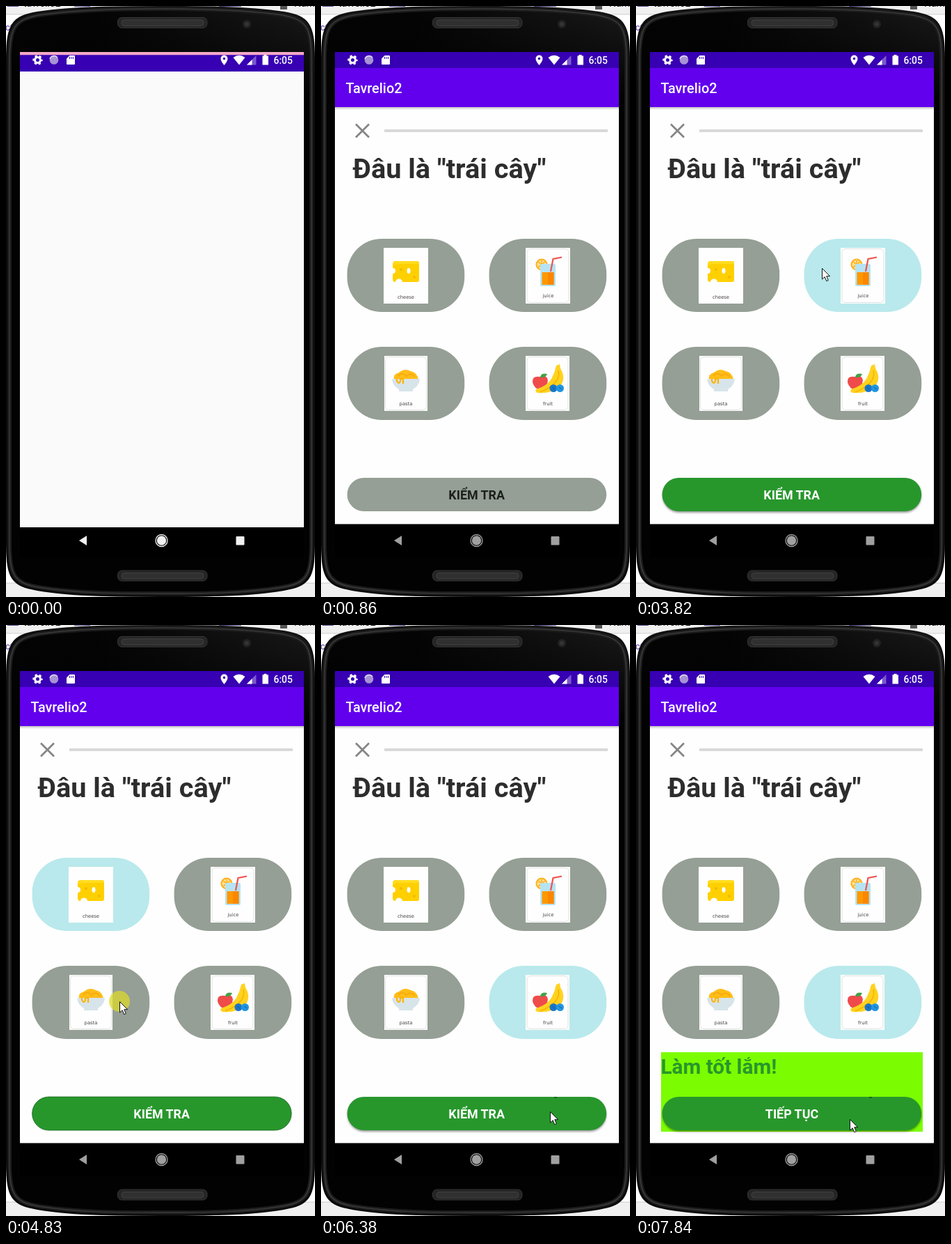
These frames come from a looping animation (444x848 px, 8 s). An HTML page:

```html
<!DOCTYPE html>
<html lang="vi">
<head>
<meta charset="utf-8">
<title>Quiz app</title>
<style>
html, body { margin: 0; width: 100%; height: 100%; overflow: hidden; background: #f2f2f2; }
svg { display: block; width: 444px; height: 848px; font-family: Roboto, sans-serif; }
text { white-space: pre; }

/* 1% of the loop is 80 ms; every change is a hard step */
.anim { animation: 8s step-end infinite; }
.label { font: 6.8px "DejaVu Sans", sans-serif; fill: #444; text-anchor: middle; }
.action { font-size: 17.86px; font-weight: 700; text-anchor: middle; }
.pill { fill: #959f95; }
.paper { fill: #fefefe; }
.edge { fill: none; stroke: #dcdfdc; stroke-width: .9; }

#first { animation-name: first; }
@keyframes first { 0% { opacity: 1 } .875%, 100% { opacity: 0 } }
#splash { animation-name: splash; }
@keyframes splash {
  0% { opacity: 1 } 7% { opacity: .8 } 7.94% { opacity: .6 }
  8.875% { opacity: .36 } 9.81% { opacity: .15 } 10.75%, 100% { opacity: 0 }
}
#nav { animation-name: nav; }
@keyframes nav { 0% { color: #f1f1f1 } 4% { color: #e0e0e0 } 7% { color: #cfcfcf } 8.875% { color: #b5b5b5 } 10.75%, 100% { color: #a0a0a0 } }
#pin { animation-name: pin; }
@keyframes pin { 0% { opacity: 1 } 71%, 100% { opacity: 0 } }

#juice { animation-name: juice; }
#cheese { animation-name: cheese; }
#pasta { animation-name: pasta; }
#fruit { animation-name: fruit; }
@keyframes juice { 35.875% { fill: #b9e9ec } 52.5% { fill: #959f95 } }
@keyframes cheese { 52.5% { fill: #b9e9ec } 62.25% { fill: #959f95 } }
@keyframes pasta { 62.25% { fill: #b9e9ec } 69.125% { fill: #959f95 } }
@keyframes fruit { 69.125%, 100% { fill: #b9e9ec } }

#button { animation-name: button; }
@keyframes button {
  0% { fill: #959f95; stroke: none }
  35.875% { fill: #27972c; stroke: none }
  52.5% { fill: #27972c; stroke: #17651b }
  65%, 100% { fill: #27972c; stroke: none }
}
#shadow { animation-name: shadow; }
@keyframes shadow { 0% { opacity: 0 } 37% { opacity: 1 } 52.5% { opacity: 0 } 65%, 100% { opacity: 1 } }
#check { animation-name: check; }
@keyframes check { 0% { fill: #1c1f1c; opacity: 1 } 35.875% { fill: #fff; opacity: 1 } 87.5%, 100% { fill: #fff; opacity: 0 } }
.done { animation-name: done; }
@keyframes done { 0% { opacity: 0 } 87.5%, 100% { opacity: 1 } }
#speck { animation-name: speck; }
@keyframes speck { 0% { opacity: 0 } 76.875%, 100% { opacity: 1 } }

#cursor { animation-name: move; }
@keyframes move {
  0% { transform: translate(500px, 900px) }
  23.375% { transform: translate(436px, 697px); animation-timing-function: steps(7) }
  30.125% { transform: translate(226px, 462px) }
  31.06% { transform: translate(219px, 440px); animation-timing-function: steps(2) }
  33% { transform: translate(262px, 408px) }
  34% { transform: translate(277px, 390px) }
  35% { transform: translate(268px, 377px) }
  47.75% { transform: translate(267px, 376px); animation-timing-function: steps(4) }
  51.75% { transform: translate(163px, 414px) }
  57.5% { transform: translate(163px, 446px); animation-timing-function: steps(2) }
  59.4% { transform: translate(163px, 540px) }
  63.25% { transform: translate(201px, 540px); animation-timing-function: steps(3) }
  66% { transform: translate(316px, 538px) }
  76.875% { transform: translate(318px, 575px); animation-timing-function: steps(3) }
  79.75% { transform: translate(329px, 698px) }
  80.75% { transform: translate(327px, 712px) }
  83.5% { transform: translate(316px, 716px) }
  85.5% { transform: translate(310px, 708px) }
  97%, 100% { transform: translate(307px, 709px) }
}
#click { animation-name: click; }
@keyframes click {
  0%, 39%, 53.5%, 62.25%, 69.125%, 75%, 88.5%, 97%, 100% { opacity: 0 }
  35%, 51.75%, 60.375%, 67%, 72.875%, 86.5%, 95.125% { opacity: .72 }
}
</style>
</head>
<body>
<svg viewBox="0 0 444 848">
  <defs>
    <linearGradient id="sheen" x1=".3" x2="1">
      <stop offset="0" stop-color="#040404"/><stop offset="1" stop-color="#1a1a1a"/>
    </linearGradient>
    <linearGradient id="sheenFade" x2="0" y2="1">
      <stop offset="0" stop-color="#020202" stop-opacity="0"/><stop offset=".16" stop-color="#020202"/>
    </linearGradient>
    <linearGradient id="fade" x2="0" y2="1">
      <stop offset="0" stop-color="#000" stop-opacity=".25"/><stop offset="1" stop-color="#000" stop-opacity="0"/>
    </linearGradient>
    <filter id="blur" x="-5%" y="-30%" width="110%" height="160%"><feGaussianBlur stdDeviation="1.6"/></filter>
    <path id="body" d="M1 76C1 26 9 15 45 9C100 1 165 1 222 1S344 1 399 9C435 15 443 26 443 76V772C443 822 435 832 399 838C344 847 280 847 222 847S100 847 45 838C9 832 1 822 1 772Z"/>
    <path id="rim" d="M5 78C5 30 12 20 47 13C102 5 165 4 222 4S342 5 397 13C432 20 439 30 439 78V770C439 818 432 828 397 834C342 843 280 843 222 843S102 843 47 834C12 828 5 818 5 770Z" fill="none"/>
    <rect id="pillShape" x="-.4" width="168.600" height="105" rx="49.600"/>
    <g id="speaker">
      <rect x="160.500" width="128.500" height="15" rx="6" fill="#252525" stroke="#353535"/>
      <rect x="166" y="3.500" width="118" height="8.500" rx="4" fill="#303030" stroke="#414141"/>
    </g>
  </defs>

  <!-- desktop behind the phone -->
  <rect width="444" height="848" fill="#f0f0f0"/>
  <rect y="12" width="444" height="816" fill="#fff"/>
  <path d="M0 12H444M0 828H444" stroke="#ccc"/>
  <text x="25" y="1" font-size="14" fill="#111">tavrelio2</text>
  <text x="414" y="1" font-size="14" fill="#111">Name</text>
  <text x="-8" y="35" font-size="13" fill="#5b35a5">acti</text>
  <path d="M2 0H18M98 0H121M306 0H338" stroke="#554d91" stroke-width="2"/>
  <path d="M394 0h10v5h-10z" fill="#555"/>

  <!-- phone -->
  <use href="#body" fill="url(#sheen)" stroke="#111" stroke-width="2"/>
  <use href="#body" fill="url(#sheenFade)"/>
  <use href="#rim" stroke="#1b1b1b" stroke-width="6"/>
  <use href="#rim" stroke="#3a3a3a" stroke-width="1.500"/>
  <use href="#speaker" y="16.500"/>
  <use href="#speaker" y="810"/>
  <circle cx="346" cy="26" r="6" fill="#222"/><circle cx="346" cy="26" r="3" fill="#343434"/>
  <rect x="20" y="66" width="408" height="725"/>

  <!-- app -->
  <rect x="20" y="89" width="408" height="654.400" fill="#fefefe"/>
  <rect x="20" y="89" width="408" height="56" fill="#6200ee"/>
  <rect x="20" y="145" width="408" height="4" fill="url(#fade)"/>
  <text x="35.500" y="125" font-size="19.840" font-weight="500" fill="#fff">Tavrelio2</text>
  <path d="M50 169.500L69 188.500M69 169.500L50 188.500" stroke="#858585" stroke-width="2.700"/>
  <rect x="91" y="177" width="321" height="4" fill="#d9d9d9"/>
  <text x="45.500" y="247" font-size="39.700" font-weight="700" fill="#2d2d2d">Đâu là "trái cây"</text>

  <g transform="translate(38 334)">
    <use id="cheese" class="pill anim" href="#pillShape"/>
    <rect class="paper" x="52" y="13" width="64" height="80"/>
    <path d="M69 32H100Q103 32 103 35V59Q103 62 100 62H79A5 4.500 0 0 0 69 62Q65 62 65 58V50A4 4 0 0 0 65 42V37Q65 32 69 32Z" fill="#ffd000"/>
    <path d="M65 38Q65 32 72 32H100Q103 32 103 36H76Q68 36 65 38Z" fill="#ffdc20"/>
    <ellipse cx="88" cy="46" rx="2.500" ry="4" fill="#fefefe"/>
    <circle cx="77" cy="44" r="2" fill="#f2b900"/><circle cx="96" cy="55" r="2" fill="#f2b900"/>
    <text class="label" x="84" y="86">cheese</text>
  </g>

  <g transform="translate(242 334)">
    <use id="juice" class="pill anim" href="#pillShape"/>
    <rect class="paper" x="52" y="13" width="64" height="80"/>
    <rect class="edge" x="54" y="14.500" width="60" height="77" rx="5"/>
    <circle cx="75" cy="37" r="8.500" fill="#ffb020"/><circle cx="75" cy="37" r="6.500" fill="#ffe08a"/>
    <path d="M70 33L80 41M80 33L70 41M75 31V43" stroke="#ffab19" stroke-width="1.300"/>
    <rect x="73" y="36" width="22" height="32" rx="2" fill="#b5e3f3"/>
    <path d="M75.500 48H92.500V66H75.500Z" fill="#ff9800"/>
    <path d="M84 48H92.500V66H84Z" fill="#fb8700"/>
    <path d="M88 47L91.500 29L104 26.500" fill="none" stroke="#ef5350" stroke-width="2.200"/>
    <text class="label" x="84.500" y="84">juice</text>
  </g>

  <g transform="translate(38 489)">
    <use id="pasta" class="pill anim" href="#pillShape"/>
    <rect class="paper" x="53" y="13" width="62" height="79"/>
    <rect class="edge" x="54.500" y="14.500" width="59" height="76" rx="5"/>
    <path d="M67 48Q65 39 74 37Q82 30 91 35Q101 37 102 48Z" fill="#ffbd17"/>
    <path d="M73 42Q78 35 85 42Q90 36 97 43" fill="none" stroke="#f5a70f" stroke-width="1.300"/>
    <path d="M64 46H104Q103 56 94 61V64H74V61Q65 56 64 46Z" fill="#d7e4ea"/>
    <path d="M71 46V49Q74 55 76 49V46H80V53" fill="none" stroke="#ffb300" stroke-width="2.200"/>
    <text class="label" x="84" y="84">pasta</text>
  </g>

  <g transform="translate(242 489)">
    <use id="fruit" class="pill anim" href="#pillShape"/>
    <rect class="paper" x="52" y="13" width="63" height="79"/>
    <rect class="edge" x="54" y="14.500" width="59" height="76" rx="5"/>
    <path d="M73 43Q82 39 84 48Q83 59 75 61Q65 62 62 51Q61 41 73 43Z" fill="#ef4b4b"/>
    <path d="M73 44Q74 37 83 39Q81 45 73 44Z" fill="#43a047"/>
    <path d="M96 27L101 25L102 31Q111 46 101 57Q88 68 69 66Q65 64 67 61Q83 56 89 46Q94 37 96 27Z" fill="#ffd21f"/>
    <path d="M99 34Q104 52 73 65" fill="none" stroke="#f5b400" stroke-width="1.600"/>
    <circle cx="92" cy="59.500" r="5.500" fill="#1976c9"/><circle cx="101.500" cy="59.500" r="5.500" fill="#2196df"/>
    <path d="M90 58l4 3M100 58l4 3" stroke="#0d5ca6"/>
    <text class="label" x="84" y="83.500">fruit</text>
  </g>

  <g class="done anim">
    <rect x="36" y="613" width="376" height="114" fill="#7cfc00"/>
    <text x="35.500" y="644" font-size="29.760" font-weight="700" fill="#27972c">Làm tốt lắm!</text>
  </g>
  <rect id="shadow" class="anim" x="38" y="679" width="372" height="48" rx="24" fill="#000" fill-opacity=".4" filter="url(#blur)"/>
  <rect id="button" class="anim" x="37.600" y="677" width="372.600" height="48" rx="24" stroke-width=".8"/>
  <text id="check" class="action anim" x="223.700" y="708">KIỂM TRA</text>
  <text class="action done anim" x="224" y="708" fill="#fff">TIẾP TỤC</text>
  <rect id="speck" class="anim" x="335" y="677" width="4" height="1.500" fill="#174f1a"/>

  <rect id="splash" class="anim" x="20" y="89" width="408" height="654.400" fill="#fafafa"/>

  <!-- system bars -->
  <rect x="20" y="66" width="408" height="23" fill="#3700b3"/>
  <g id="first" class="anim">
    <rect x="20" y="66" width="408" height="4.500" fill="#f4a9c7"/>
    <rect x="20" y="70.500" width="408" height="23.500" fill="#3700b3"/>
    <rect x="20" y="94" width="408" height="654" fill="#fafafa"/>
  </g>
  <g fill="#fff">
    <circle cx="45.500" cy="77.500" r="4" fill="none" stroke="#fff" stroke-width="3"/>
    <circle cx="45.500" cy="77.500" r="6" fill="none" stroke="#fff" stroke-width="2.400" stroke-dasharray="3.140" stroke-dashoffset="1.570"/>
    <circle cx="69" cy="77.500" r="6.300" fill="#a793d4"/>
    <path d="M63 76A6.300 6.300 0 0 1 74 74" fill="none" stroke="#e5dff4" stroke-width="1.500"/>
    <path d="M91.500 71H98Q99 71 99 72V83Q99 84 98 84H88Q87 84 87 83V75.500Z"/>
    <path d="M91.500 73v3M94 73v3M96.500 73v3" stroke="#3700b3"/>
    <path id="pin" class="anim" fill-rule="evenodd" d="M313.500 70.500A5 5 0 0 1 318.500 75.500Q318.500 79 313.500 85Q308.500 79 308.500 75.500A5 5 0 0 1 313.500 70.500ZM313.500 73.700A1.800 1.800 0 1 0 313.500 77.300A1.800 1.800 0 1 0 313.500 73.700Z"/>
    <path d="M326.500 74Q335 67.500 343.500 74L335 84.500Z"/>
    <path d="M359.500 71V84.500H346Z" opacity=".35"/><path d="M353.500 77V84.500H346Z"/>
    <path d="M370.500 70H374.500V71.500H377V84.500H368.500V71.500H370.500Z"/>
    <text x="384.500" y="83" font-size="13.900" font-weight="500">6:05</text>
  </g>
  <g id="nav" class="anim" fill="currentColor">
    <path d="M105 767L116 760V774Z"/>
    <circle cx="223.500" cy="767" r="6.700"/>
    <circle cx="223.500" cy="767" r="8.500" fill="none" stroke="currentColor" stroke-width="1.300"/>
    <rect x="330.500" y="761" width="12" height="12.500" rx="1"/>
  </g>

  <g id="cursor" class="anim">
    <circle id="click" class="anim" r="15" fill="#dfdc28"/>
    <path d="M.5 .5V16L4.200 12.700L6.700 18.700L9.300 17.600L6.800 11.700H11.600Z" fill="#fff" stroke="#111"/>
  </g>
</svg>
</body>
</html>
```
